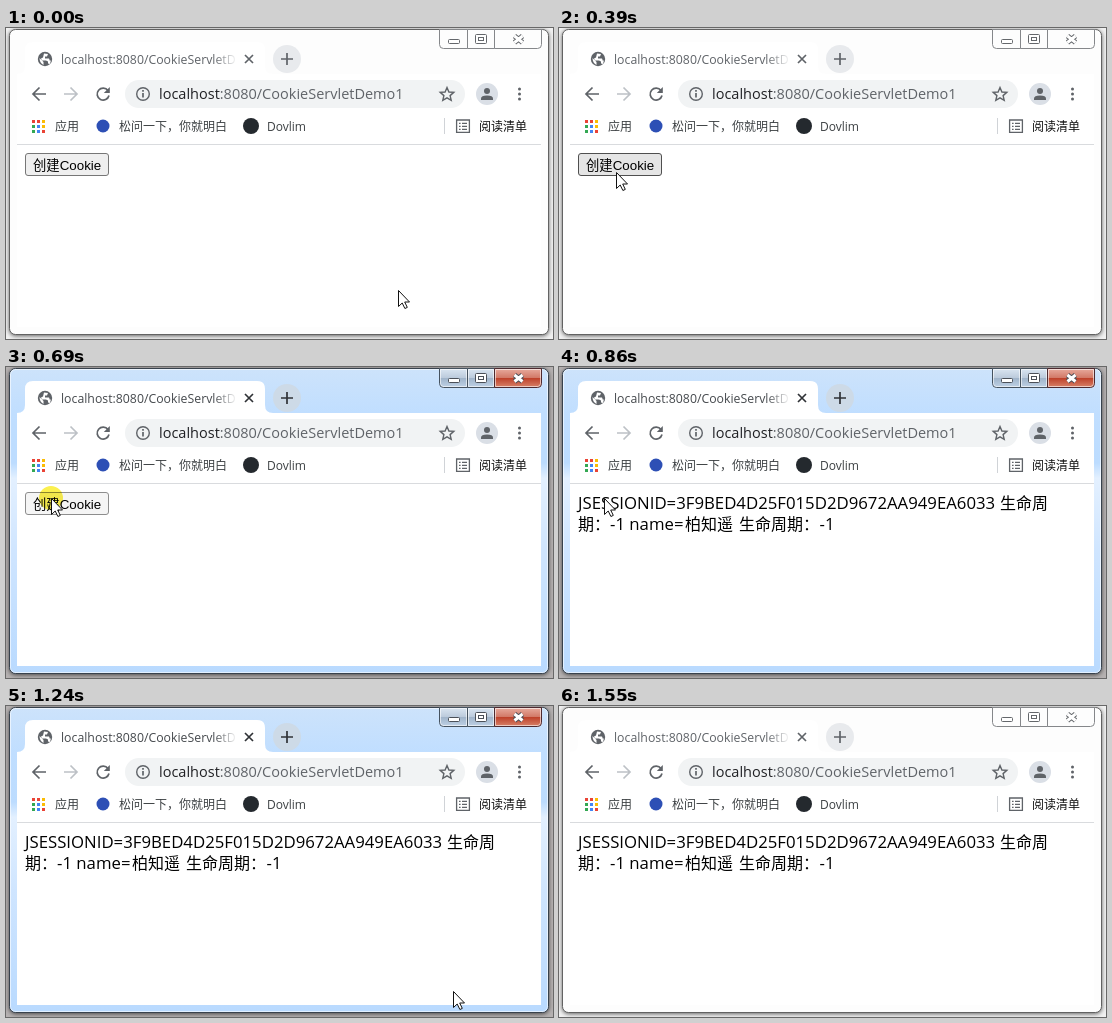
An HTML page that plays this animation: 547x311 px, repeating every 1650 ms.

```html
<!DOCTYPE html>
<html lang="zh-CN">
<head>
<meta charset="utf-8">
<title>Cookie demo</title>
<style>
html, body { margin: 0; width: 100%; height: 100%; overflow: hidden; background: #fff; }
svg { display: block; width: 547px; height: 311px; }
text { font-family: "Open Sans", "Noto Sans CJK SC", "Noto Sans CJK", sans-serif; white-space: pre; }
.cjk { font-family: "Noto Sans CJK SC", "Noto Sans CJK", sans-serif; }
.centred { font-family: "Noto Sans CJK TC", "Noto Sans CJK", sans-serif; }
.line { fill: none; stroke: #5f6368; stroke-width: 1.7; }
.bar { font-size: 12px; fill: #3c4043; }
#tabTitle { font-size: 12.3px; fill: #5f6368; }
#url { font-size: 14.5px; fill: #5f6368; }
#result .latin { font-size: 16.75px; }
#result .cjk { font-size: 16px; }

#backdrop { fill: #f1f1f1; }
#frame { fill: #fdfdfd; stroke: #626262; filter: drop-shadow(0 1px 2px #0009); }
#newTab { fill: #e8eaed; }
.caption { fill: #fdfdfd; stroke: #85878a; }
.glyph { fill: #fff; stroke: #64676b; }
.focused #backdrop { fill: #b5b1b1; }
.focused #frame { fill: url(#glass); stroke: #38424d; }
.focused #newTab { fill: #cddae7; }
.focused #tabTitle { fill: #45494d; }
.focused .tabIcon { stroke: #2f3236; }
.focused .caption { fill: url(#steel); stroke: #45525f; }
.focused #close { fill: url(#red); stroke: #4d2a30; }
.focused .glyph { stroke: #4b5058; }
.aero { visibility: hidden; fill: none; stroke: #fff; stroke-opacity: .6; }
.focused .aero { visibility: visible; }

#button rect { fill: #efefef; stroke: #767676; }
#button.hover rect { fill: #e5e5e5; stroke: #4f4f4f; }
#button.pressed rect { fill: #f5f5f5; stroke: #8d8d8d; }
#click { fill: #fbf04f; mix-blend-mode: multiply; }
</style>
</head>
<body>
<svg id="stage" viewBox="0 0 547 311">
  <defs>
    <linearGradient id="glass" x2="0" y2="1">
      <stop stop-color="#cde3fb"/><stop offset=".15" stop-color="#c0deff"/>
      <stop offset=".31" stop-color="#bcdcff"/><stop offset=".36" stop-color="#e3f0ff"/>
      <stop offset=".6" stop-color="#cfe5ff"/><stop offset="1" stop-color="#b9daff"/>
    </linearGradient>
    <linearGradient id="steel" x2="0" y2="1">
      <stop stop-color="#dbe6f2"/><stop offset=".48" stop-color="#bccbdc"/>
      <stop offset=".5" stop-color="#9fb3c9"/><stop offset="1" stop-color="#bfd2e6"/>
    </linearGradient>
    <linearGradient id="red" x2="0" y2="1">
      <stop stop-color="#e8ac9f"/><stop offset=".48" stop-color="#d27a68"/>
      <stop offset=".5" stop-color="#bd3f28"/><stop offset="1" stop-color="#d8836a"/>
    </linearGradient>
    <linearGradient id="fade">
      <stop stop-color="#fff" stop-opacity="0"/><stop offset="1" stop-color="#fff"/>
    </linearGradient>
  </defs>

  <rect id="backdrop" width="547" height="311"/>
  <rect id="frame" x="3.5" y="1.5" width="539" height="305" rx="6"/>
  <rect class="aero" x="4.5" y="2.5" width="537" height="303" rx="5"/>

  <path class="caption" d="M433.5 1.5V16.5q0 4 4 4H461.5V1.5z"/>
  <path class="caption" d="M461.5 1.5h27v19h-27z"/>
  <path class="caption" id="close" d="M488.5 1.5H535.5V16.5q0 4-4 4H488.5z"/>
  <path class="aero" d="M434.500 2.500V16.500q0 3 3 3H460.500V2.500zM462.500 2.500h25v17h-25zM489.500 2.500H534.500V16.500q0 3-3 3H489.500z"/>
  <g class="glyph">
    <rect x="442.5" y="11.5" width="11" height="4" rx="1"/>
    <rect x="469.5" y="6.5" width="11" height="9" rx="1"/>
    <rect x="472.5" y="9.5" width="5" height="3"/>
    <path stroke-width="5" d="M508.5 8l8 6.500m0-6.500l-8 6.500"/>
    <path style="stroke:#fff" stroke-width="3" d="M508.500 8l8 6.500m0-6.500l-8 6.500"/>
  </g>

  <path fill="#fff" d="M11 46q8 0 8-8V22q0-8 8-8H251q8 0 8 8V38q0 8 8 8H535V299H11z"/>
  <circle cx="39" cy="31" r="7.2" fill="#5f6368"/>
  <path fill="#fff" d="M33.5 30l4 4v3q-4-2-4-7zM38 25.5l4 .5-1 2.5h-2v2h4l1 2.5 1-1-1 4-2-.5v-2l-2-1h-4l-1-2 2-1z"/>
  <text id="tabTitle" x="55" y="35.5">localhost:8080/CookieServletD</text>
  <rect x="208" y="20" width="23" height="22" fill="url(#fade)"/>
  <rect x="229" y="20" width="8" height="22" fill="#fff"/>
  <path class="line tabIcon" d="M239 27l8 8m0-8l-8 8"/>
  <circle id="newTab" cx="281" cy="31" r="14"/>
  <path class="line tabIcon" d="M275 31h12M281 25v12"/>

  <path class="line" d="M40 66H27.5M33.5 59.5L27 66l6.5 6.5"/>
  <path class="line" style="stroke:#bdc1c6" d="M58 66H70.5M64.5 59.5L71 66l-6.5 6.5"/>
  <path class="line" d="M102 62.5A6 6 0 1 0 103 67.5"/>
  <path fill="#5f6368" d="M103.8 59v6h-6z"/>
  <rect x="119" y="52" width="340" height="28" rx="14" fill="#f1f3f4"/>
  <circle class="line" style="stroke-width:1.4" cx="137" cy="66" r="6.3"/>
  <path class="line" d="M137 65v4.5M137 62v1.7"/>
  <text id="url" x="153" y="71"><tspan fill="#202124">localhost</tspan>:8080/CookieServletDemo1</text>
  <path class="line" style="stroke-width:1.4" d="M441 59.5l1.9 4.5 4.9.4-3.7 3.2 1.1 4.7-4.2-2.5-4.2 2.5 1.1-4.7-3.7-3.2 4.9-.4z"/>
  <circle cx="481" cy="66" r="11" fill="#dadfe6"/>
  <g fill="#5f6368">
    <circle cx="481" cy="63" r="3"/>
    <path d="M475 72v-1.5q0-3 6-3t6 3V72z"/>
    <circle cx="513.5" cy="61" r="1.5"/><circle cx="513.5" cy="66" r="1.5"/><circle cx="513.5" cy="71" r="1.5"/>
  </g>

  <g id="apps"></g>
  <text class="bar cjk" x="49" y="103">应用</text>
  <circle cx="97" cy="98" r="6.5" fill="#2d4fb5"/>
  <text class="bar cjk" x="113" y="103">松问一下<tspan class="centred">，</tspan>你就明白</text>
  <circle cx="245" cy="98" r="8" fill="#24292e"/>
  <text class="bar" x="261" y="103">Dovlim</text>
  <path stroke="#d0d3d7" d="M438.5 90v16"/>
  <path class="line" style="stroke-width:1.3" d="M450.6 92h12.8v12.4h-12.8zM453 95.3h1.6m1.4 0h5M453 98.3h1.6m1.4 0h5M453 101.3h1.6m1.4 0h5"/>
  <text class="bar cjk" style="fill:#111" x="473" y="103">阅读清单</text>
  <path stroke="#d9dbde" d="M11 116.5H535"/>

  <g id="button">
    <rect x="19.5" y="125.5" width="83" height="22" rx="2.5"/>
    <text class="cjk" x="27" y="142" font-size="13.333">创建</text>
    <text x="53.7" y="142" style="font:13.333px 'Liberation Sans',sans-serif">Cookie</text>
  </g>
  <g id="result">
    <text class="latin" x="19" y="142">JSESSIONID=3F9BED4D25F015D2D9672AA949EA6033</text>
    <text class="cjk" x="441" y="142">生命周</text>
    <text class="cjk" x="19" y="163">期<tspan class="centred">：</tspan></text>
    <text class="latin" x="51" y="163">-1 name=</text>
    <text class="cjk" x="126" y="163">柏知遥</text>
    <text class="cjk" x="180" y="163">生命周期<tspan class="centred">：</tspan></text>
    <text class="latin" x="260.5" y="163">-1</text>
  </g>

  <circle id="click" cx="45" cy="131" r="12"/>
  <path id="cursor" d="M.5.5V16.5L4.2 13 6.9 18.5 9.3 17.4 6.7 12H11.5z" fill="#fff" stroke="#111"/>
</svg>
<script>
const $ = id => document.getElementById(id);
const LOOP = 1650;
const ticks = [0, 70, 150, 220, 300, 380, 460, 540, 620, 690, 790,
  860, 930, 1010, 1090, 1170, 1240, 1320, 1400, 1480, 1550];
// Cursor stops: time, x, y
const stops = [[0, 392, 262], [220, 63, 151], [620, 45, 131], [860, 45, 131],
  [1240, 447, 285], [1480, 456, 312], [LOOP, 456, 312]];

const colors = ['#ea4335', '#ea4335', '#fbbc04', '#34a853', '#4285f4', '#fbbc04', '#34a853', '#4285f4', '#ea4335'];
$('apps').innerHTML = colors.map((color, i) =>
  `<rect x="${26 + i % 3 * 5}" y="${92 + Math.floor(i / 3) * 5}" width="3" height="3" fill="${color}"/>`).join('');

function cursorAt(t) {
  const i = stops.findIndex(stop => stop[0] > t);
  const [t0, x0, y0] = stops[i - 1], [t1, x1, y1] = stops[i];
  const p = (t - t0) / (t1 - t0), k = p * p * (3 - 2 * p);
  return [x0 + (x1 - x0) * k, y0 + (y1 - y0) * k].map(Math.round);
}

function show(id, visible) {
  $(id).style.display = visible ? '' : 'none';
}

function draw() {
  const now = performance.now() % LOOP;
  const t = ticks.findLast(tick => tick <= now);
  const [x, y] = cursorAt(t);
  const pressed = t >= 690 && t < 790;
  const hover = x > 19 && x < 103 && y > 125 && y < 148;

  $('stage').classList.toggle('focused', t >= 690 && t < 1550);
  $('button').setAttribute('class', pressed ? 'pressed' : hover ? 'hover' : '');
  show('button', t < 860);
  show('result', t >= 860);
  show('click', pressed);
  $('cursor').setAttribute('transform', `translate(${x} ${y})`);
  requestAnimationFrame(draw);
}
draw();
</script>
</body>
</html>
```
